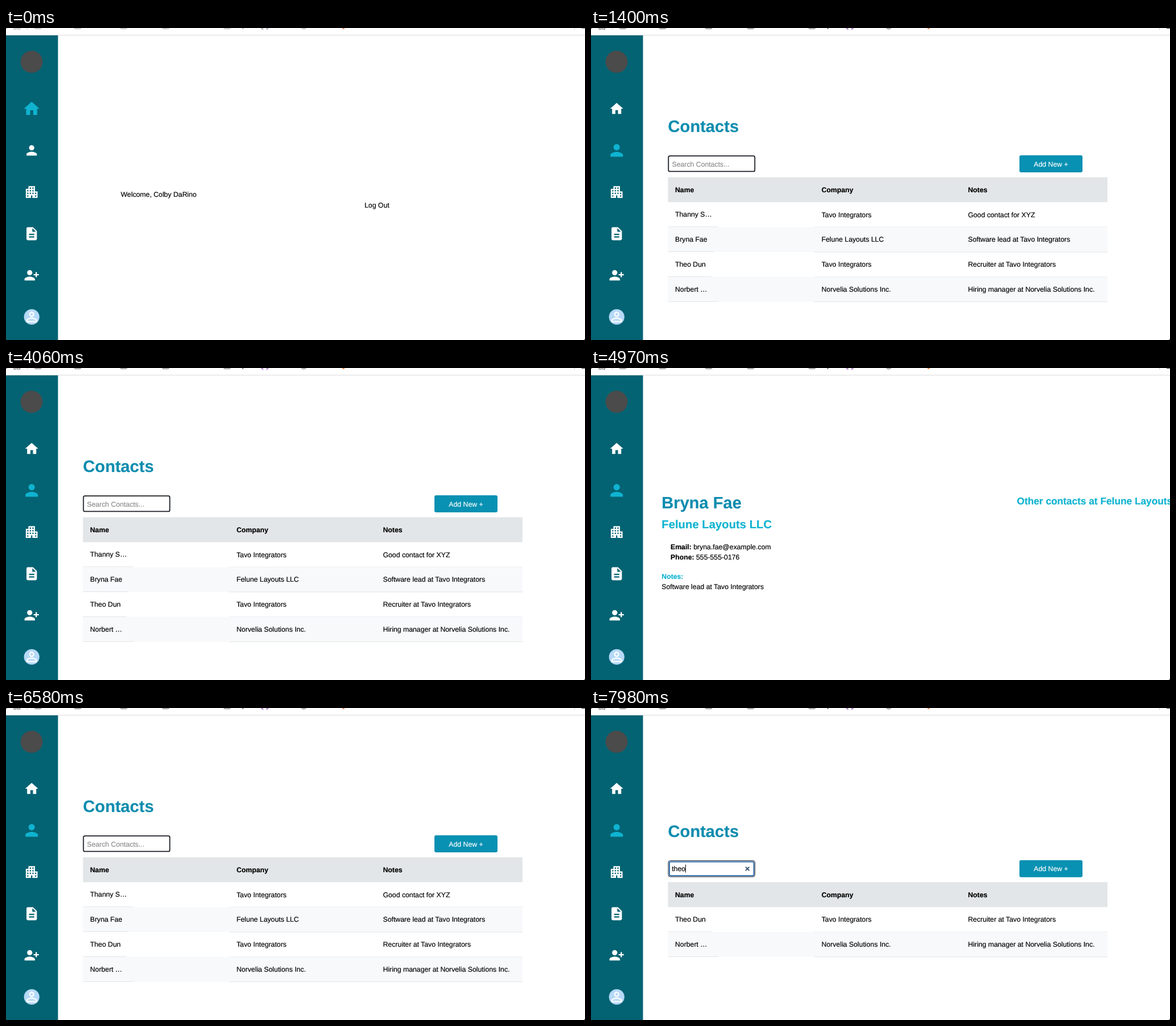
Write an HTML page that moves like this. It is 1019 px wide and 549 px high and loops after 8 s.

```html
<!DOCTYPE html>
<html lang="en">
<head>
<meta charset="utf-8">
<title>Contacts</title>
<style>
  html, body { margin: 0; width: 100%; height: 100%; overflow: hidden; background: #fff; }
  svg { display: block; width: 100%; height: 100%; }
  text {
    --ink: #000;
    font: 12.28px "Liberation Sans", Arial, sans-serif;
    fill: var(--ink);
    stroke: var(--ink);
    stroke-width: .18px;
    text-rendering: geometricPrecision;
    white-space: pre;
  }
  .b { font-weight: bold; }
  .h1 { font-weight: bold; font-size: 29.1px; --ink: #0d8cae; }
  .h2 { font-weight: bold; font-size: 20.3px; --ink: #0fb3d0; }
  .h3 { font-weight: bold; font-size: 17.3px; --ink: #0fb3d0; }
  .note { font-weight: bold; --ink: #0fb3d0; }
  .hint { --ink: #8c8c8c; }
  .white { --ink: #fff; }
</style>
</head>
<body>
<svg viewBox="0 0 1019 549">
  <g id="bar"></g>
  <rect y="13" width="91.5" height="536" fill="#036373"/>
  <circle cx="45" cy="59.5" r="19.5" fill="#4b4b4b"/>
  <g id="nav"></g>
  <g id="page"></g>
  <path d="M1019 547v2h-2z" fill="#444"/>
</svg>
<script>
const LOOP = 8000, CYAN = "#0fb3d0";

const ICONS = [
  "M10 20v-6h4v6h5v-8h3L12 3 2 12h3v8z",
  "M12 12c2.21 0 4-1.79 4-4s-1.79-4-4-4-4 1.79-4 4 1.79 4 4 4zm0 2c-2.67 0-8 1.34-8 4v2h16v-2c0-2.66-5.33-4-8-4z",
  "M17 11V3H7v4H3v14h8v-4h2v4h8V11h-4zM7 19H5v-2h2v2zm0-4H5v-2h2v2zm0-4H5V9h2v2zm4 4H9v-2h2v2zm0-4H9V9h2v2zm0-4H9V5h2v2zm4 8h-2v-2h2v2zm0-4h-2V9h2v2zm0-4h-2V5h2v2zm4 12h-2v-2h2v2zm0-4h-2v-2h2v2z",
  "M14 2H6c-1.1 0-1.99.9-1.99 2L4 20c0 1.1.89 2 1.99 2H18c1.1 0 2-.9 2-2V8l-6-6zm2 16H8v-2h8v2zm0-4H8v-2h8v2zm-3-5V3.5L18.5 9H13z",
  "M13 8c0-2.21-1.79-4-4-4S5 5.79 5 8s1.79 4 4 4 4-1.79 4-4zm2 2v2h3v3h2v-3h3v-2h-3V7h-2v3h-3zM1 18v2h16v-2c0-2.66-5.33-4-8-4s-8 1.34-8 4z",
  "M12 5.9a2.1 2.1 0 1 1 0 4.2 2.1 2.1 0 1 1 0-4.2m0 9c2.97 0 6.1 1.46 6.1 2.1v1.1H5.9V17c0-.64 3.13-2.1 6.1-2.1M12 4C9.79 4 8 5.79 8 8s1.79 4 4 4 4-1.79 4-4-1.79-4-4-4zm0 9c-2.67 0-8 1.34-8 4v3h16v-3c0-2.66-5.33-4-8-4z"
];

// short name, right end of its underline, company, notes
const PEOPLE = [
  ["Thanny S…", 224, "Tavo Integrators", "Good contact for XYZ"],
  ["Bryna Fae", 216, "Felune Layouts LLC", "Software lead at Tavo Integrators"],
  ["Theo Dun", 212, "Tavo Integrators", "Recruiter at Tavo Integrators"],
  ["Norbert …", 224, "Norvelia Solutions Inc.", "Hiring manager at Norvelia Solutions Inc."]
];
const ROW = 43.85;

const text = (x, y, s, cls = "") => `<text x="${x}" y="${y}" class="${cls}">${s}</text>`;
const rect = (x, y, w, h, fill, more = "") =>
  `<rect x="${x}" y="${y}" width="${w}" height="${h}" fill="${fill}" ${more}/>`;
const clamp = v => Math.max(0, Math.min(1, v));

// lower edge of the cut-off bookmarks bar
function bar(sharp) {
  const ink = sharp ? "#555" : "#999";
  const folders = [50, 120, 201, 275, 383].map(x =>
    `<path d="M${x + .5} -1v1q0 1.3 1.3 1.3h8.6q1.3 0 1.3-1.3v-1" fill="none" stroke="${ink}"/>`);
  const brace = sharp ? "#8652b5" : "#8d87a0";
  return folders.join("") +
    rect(14, -2, 4, 4, "none", `stroke="${ink}"`) + rect(20.5, -2, 4, 4, "none", `stroke="${ink}"`) +
    rect(0, 0, 2, 1, ink) + rect(37, 0, 1, 3, "#ccc") + rect(1000, 0, 1, 3, "#ccc") +
    rect(1013, 0, 6, 1.2, ink) + rect(416, 0, 1.5, 2, ink) +
    `<path d="M450 0q0 2 3 2M461 0q0 2-3 2" fill="none" stroke="${brace}" stroke-width="1.3"/>` +
    `<path d="M520 0q4 3.5 8 0" fill="none" stroke="${ink}"/>` +
    `<circle cx="594" cy="0" r="2" fill="#e8843c"/>` + rect(0, 12, 1019, 1, "#dcdcdc");
}

// k: 0 = home active, 1 = contacts active
function nav(k) {
  return `<circle cx="45.2" cy="508.4" r="13.6" fill="#b5d9f8"/>` + ICONS.map((d, i) => {
    const on = i == 0 ? 1 - k : i == 1 ? k : 0;
    const fill = `color-mix(in srgb, ${CYAN} ${on * 100}%, white)`;
    return `<path d="${d}" fill-rule="evenodd" style="fill:${fill}"
      transform="translate(45.2 ${142.1 + 73.27 * i}) scale(${1.147 * (1 + .2 * on)}) translate(-12 -12)"/>`;
  }).join("");
}

const home = () => text(202, 297.3, "Welcome, Colby DaRino") + text(631, 315.8, "Log Out");

function search(y, query) {
  const hint = text(142.5, y + 19.3, "Search Contacts...", "hint");
  if (query === null)
    return rect(136.3, y + 1, 152, 27.2, "#fff", 'rx="2.5" stroke="#1c1f26" stroke-width="1.8"') + hint;
  const caret = [142.7, 146.3, 153, 160, 166][query.length];
  return rect(136, y + .5, 152.5, 28.5, "#fff", 'rx="3.5" stroke="#23272e"') +
    rect(138, y + 2.5, 148.5, 24.5, "#fff", 'rx="2" stroke="#2063a8" stroke-width="1.8"') +
    (query ? text(142.3, y + 19.3, query) +
      `<path d="M272 ${y + 11.5}l6.6 6.6m0-6.6l-6.6 6.6" stroke="#2b4a6c" stroke-width="1.7"/>` : hint) +
    rect(caret, y + 7.5, 1, 14, "#000");
}

function list(rows, query = null) {
  const top = rows.length ? 262.6 + (4 - rows.length) * ROW / 2 : 340.6;
  const cols = rows.length ? [148, 405.7, 663.5] : [148, 375.5, 691];
  const first = top + 43.9;
  let s = text(135.6, top - 79.6, "Contacts", "h1") + search(top - 38.4, query) +
    rect(754, top - 38.6, 111, 30, "#0891b2", 'rx="3"') +
    text(779.3, top - 19.1, "Add New +", "white") +
    rect(135.5, top, 773.5, 43.9, "#e2e6e8") +
    ["Name", "Company", "Notes"].map((h, i) => text(cols[i], top + 26.4, h, "b")).join("");
  if (!rows.length)
    s += text(330.2, top + 57.8, 'No contacts saved. Click "Add New +" to start saving contacts.');
  rows.forEach((id, i) => {
    const [name, end, company, notes] = PEOPLE[id];
    const y = first + i * ROW, base = y + 26.1;
    if (i % 2) s += rect(135.5, y, 773.5, ROW, "#f8f9fb");
    s += rect(135.5, y + ROW - 1.1, end - 135.5, 1, "#e1e4e7") +
      rect(393, y + ROW - .6, 516, 1, "#e1e4e7") +
      text(cols[0], base - .3, name) + text(cols[1], base, company) + text(cols[2], base, notes);
  });
  return s;
}

function detail(name, company, email, phone, notes, others) {
  const field = (y, label, value) =>
    `<text x="140" y="${y}"><tspan class="b">${label}:</tspan> ${value}</text>`;
  return text(124.3, 247.3, name, "h1") + text(124.3, 281.8, company, "h2") +
    field(318.7, "Email", email) + field(337.1, "Phone", phone) +
    text(124.3, 371, "Notes:", "note") + text(124.3, 389.3, notes) +
    text(749.5, 240.3, "Other contacts at " + company, "h3") +
    others.map((o, i) => `<circle cx="752" cy="${268.8 + i * 18.4}" r="1.9"/>` +
      text(766, 272.8 + i * 18.4, o)).join("");
}

const ALL = [0, 1, 2, 3], T_ROWS = [0, 2, 3], THEO_ROWS = [2, 3];
const SCENES = [
  [0, home],
  [910, () => list([])],
  [1260, () => list(ALL)],
  [2310, () => detail("Thanny Sarmel", "Tavo Integrators", "thany@email.test", "555-555-0142",
    "Good contact for XYZ", ["Theo Dun", "Bryna Fae"])],
  [4060, () => list(ALL)],
  [4970, () => detail("Bryna Fae", "Felune Layouts LLC", "bryna.fae@example.com", "555-555-0176",
    "Software lead at Tavo Integrators", [])],
  [6580, () => list(ALL)],
  [7140, () => list(ALL, "")],
  [7700, () => list(T_ROWS, "t")],
  [7770, () => list(T_ROWS, "th")],
  [7910, () => list(THEO_ROWS, "the")],
  [7980, () => list(THEO_ROWS, "theo")]
];

const shown = {};
function put(id, key, draw) {
  if (shown[id] === key) return;
  shown[id] = key;
  document.getElementById(id).innerHTML = draw(key);
}

function render(t) {
  put("bar", t >= 420, bar);
  put("nav", clamp(Math.floor((t - 840) / 70) / 3), nav);
  put("page", SCENES.findLastIndex(([start]) => t >= start), i => SCENES[i][1]());
}

const start = performance.now();
function tick() {
  render((performance.now() - start) % LOOP);
  requestAnimationFrame(tick);
}
tick();
</script>
</body>
</html>
```
